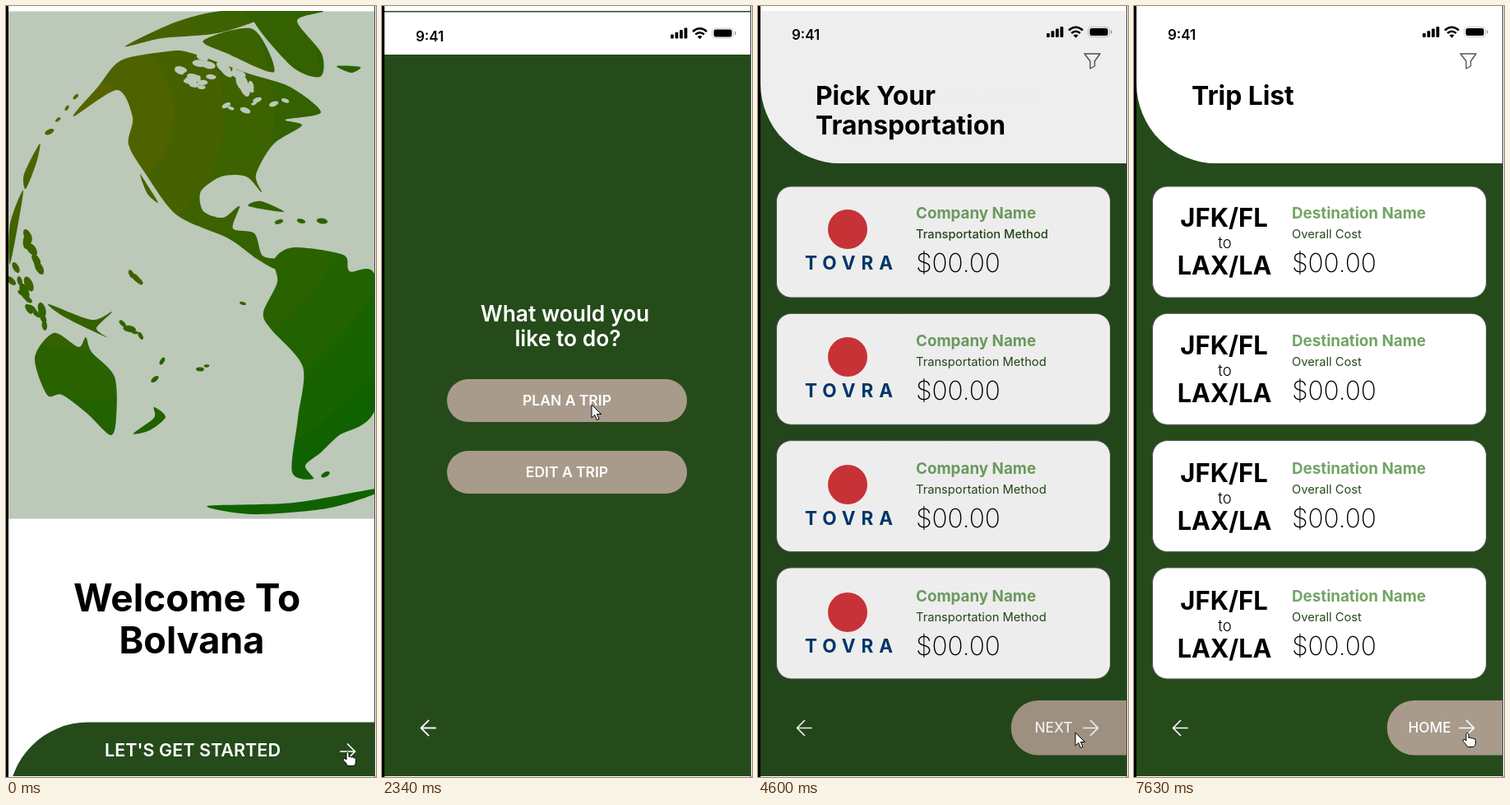
Recreate the animation shown at these times as an HTML page. Size 450 px wide and 936 px high, loop 8 s.

```html
<!DOCTYPE html>
<html lang="en">
<head>
<meta charset="utf-8">
<title>Trip planner walkthrough</title>
<style>
  html, body { margin: 0; width: 100%; height: 100%; overflow: hidden; background: #fff; }
  svg { display: block; width: 450px; height: 936px; font-family: Inter, "Open Sans", sans-serif; }
  .line { fill: none; stroke: #fff; stroke-width: 1.7; stroke-linecap: round; stroke-linejoin: round; }
</style>
</head>
<body>
<svg id="stage" viewBox="0 0 450 936"></svg>
<script>
const GREEN = '#254b1b', TAN = '#a89b8b', SEA = '#bcc8b8', LEAF = '#72a564', LAND = 'url(#landFill)';

// ---- drawing helpers ----
const repeat = (n, draw) => Array.from({ length: n }, (_, i) => draw(i)).join('');
const text = (str, x, y, size, weight = 400, fill = '#000', extra = '') =>
  `<text x="${x}" y="${y}" font-size="${size}" font-weight="${weight}" fill="${fill}" ${extra}>${str}</text>`;
const centered = (str, x, y, size, weight, fill = '#fff') =>
  text(str, x, y, size, weight, fill, 'text-anchor="middle"');
const rect = (x, y, w, h, fill, rx = 0, extra = '') =>
  `<rect x="${x}" y="${y}" width="${w}" height="${h}" rx="${rx}" fill="${fill}" ${extra}/>`;
const path = (d, fill) => `<path d="${d}" fill="${fill}"/>`;
const line = (d, extra = '') => `<path class="line" d="${d}" ${extra}/>`;
const shift = (x, y, content) => `<g transform="translate(${x} ${y})">${content}</g>`;

let seed = 7;
const random = () => (seed = seed * 16807 % 2147483647) / 2147483647;
const jitter = amount => (random() - 0.5) * 2 * amount;

// ---- globe ----
// Closed smooth coast through a few key points
function land(points) {
  const p = points.split(' ').map(s => s.split(',').map(Number));
  const at = i => p[(i + p.length) % p.length];
  const handle = (i, sign) => at(i).map((v, k) => v + sign * (at(i + 1)[k] - at(i - 1)[k]) / 7);
  return path(`M${p[0]}` + p.map((_, i) => `C${handle(i, 1)} ${handle(i + 1, -1)} ${at(i + 1)}`).join('') + 'Z', LAND);
}

// Small islands (or lakes) scattered along a line
function chain(n, x0, y0, x1, y1, size = 3, spread = 2, fill = LAND) {
  const slope = Math.atan2(y1 - y0, x1 - x0) * 180 / Math.PI;
  return repeat(n, i => {
    const u = n > 1 ? i / (n - 1) : 0;
    const x = x0 + (x1 - x0) * u + jitter(spread), y = y0 + (y1 - y0) * u + jitter(spread);
    const length = size * (1 + random()), turn = slope + jitter(30);
    return `<ellipse cx="${x}" cy="${y}" rx="${length}" ry="${length / 2}" fill="${fill}" transform="rotate(${turn} ${x} ${y})"/>`;
  });
}

const globe = () => [
  // the Americas
  land('82,134 112,98 140,66 198,55 225,57 295,82 345,98 383,129 340,138 360,145 325,168 304,205 311,226 292,207 262,207 237,225 240,249 264,257 284,243 276,270 302,276 312,303 334,308 330,320 305,307 270,282 208,254 170,204 149,168 154,135 135,102'),
  land('326,308 350,293 410,302 418,322 450,331 450,486 404,522 383,542 364,558 374,574 348,566 355,500 361,438 322,392 313,372 330,335'),
  land('163,204 175,222 185,239 172,228'),
  land('295,243 310,237 338,250'),
  chain(3, 333, 261, 384, 261, 4, 1),
  // the far north, with its lakes
  land('145,49 205,20 262,6 330,6 262,32 190,39'),
  land('298,6 385,6 354,18 384,58 382,86 346,72'),
  land('240,42 300,28 326,80 270,58'),
  land('402,73 431,74 420,81'),
  chain(10, 205, 84, 242, 94, 4.5, 9, SEA),
  chain(9, 232, 62, 300, 98, 5.5, 9, SEA),
  chain(7, 262, 124, 335, 118, 3.5, 6, SEA),
  chain(6, 282, 80, 298, 102, 6, 5, SEA),
  // the south
  land('245,607 350,603 450,586 450,592 390,610 300,617'),
  chain(1, 390, 568, 390, 568),
  // East Asia and Oceania
  land('41,167 22,204 24,222 37,190'),
  land('21,224 5,264 4,313 10,290'),
  chain(4, 52, 152, 84, 110, 3, 1),
  chain(7, 25, 280, 40, 318, 5, 3),
  chain(13, 8, 325, 45, 385, 5.5, 8),
  land('52,362 104,381 129,371 110,391 122,402 72,378'),
  land('35,427 58,397 88,414 97,402 104,420 132,450 134,500 127,521 98,494 68,472 50,472'),
  land('155,519 180,500 180,487 194,499 175,515'),
  chain(4, 143, 387, 164, 402, 4),
  chain(3, 152, 325, 162, 334, 4, 1),
  chain(2, 190, 431, 181, 453, 3, 0),
  chain(2, 236, 441, 244, 437, 2.5, 0),
  chain(1, 288, 361, 288, 361, 2, 0),
].join('');

// Concentric bands, each a little less red than the one inside it
const landGradient = () => {
  const radius = 530, edge = k => Math.max(0, 61 * k - 18) / radius;
  return `<radialGradient id="landFill" gradientUnits="userSpaceOnUse" cx="100" cy="130" r="${radius}">` +
    repeat(9, k => [edge(k), edge(k + 1)].map(offset =>
      `<stop offset="${offset}" stop-color="rgb(${88 - 9 * k} 98 0)"/>`).join('')) + '</radialGradient>';
};

// ---- interface parts ----
const backArrow = line('M65 876.5H48M56.5 867.5l-9 9 9 9');
const forwardArrow = (x, y) => line(`M${x} ${y}h17.5m-9-9l9 9-9 9`);
const pill = (y, label) => rect(79, y, 292, 52, TAN, 26) + centered(label, 225, y + 32, 17.5, 600);

const statusBar = top => shift(0, top,
  text('9:41', 41, 17, 17, 600) +
  repeat(4, i => rect(351 + i * 5.5, 9 - i * 2.7, 3.8, 5 + i * 2.7, '#000', 1)) +
  line('M378 5.5q8.5-7.5 17 0M381.2 9q5.3-4.5 10.6 0', 'style="stroke:#000;stroke-width:2.6;stroke-linecap:butt"') +
  path('M383.5 11.5q3-2 6 0l-3 3.2z', '#000') +
  rect(401.5, 1.5, 26, 12, 'none', 3.5, 'stroke="#ccc"') + rect(403.5, 3, 22, 9, '#000', 2.5) +
  rect(429, 5.5, 1.3, 4, '#999'));

const header = (...lines) => rect(3, 6, 445, 929, GREEN) +
  path('M3 6V94A97 97 0 0 0 100 191H448V6Z', '#fff') + statusBar(24) +
  line('M397 58H416L409.5 67V73L404 76V67Z', 'style="stroke:#555;stroke-width:1.4"') +
  lines.map((s, i) => text(s, 70, 120 + i * 36, 31.8, 700)).join('');

const footer = label => backArrow +
  path('M341 843H448V909.5H341A33 33 0 0 1 341 843Z', TAN) +
  centered(label, 359.5, 882, 17.2, 500) + forwardArrow(396, 876.5);

const field = (top, label) => shift(0, top,
  centered(label, 226, 26, 25.5, 600) +
  text('Enter your response here', 105, 97, 20, 500, '#9bad97') +
  rect(32, 113.5, 388, 1, '#3a5c33') +
  '<circle class="line" cx="375.5" cy="88" r="8"/>' + line('M381.5 94l6 6'));

const cards = content => repeat(4, i =>
  rect(22.5, 219 + i * 154.3, 406, 135, '#fff', 18, 'stroke="#555"') + shift(0, i * 155, content(i)));
const details = (x, name, note, price, noteWeight = 400) =>
  text(name, x, 258, 18.8, 700, LEAF) + text(note, x, 282, 14.7, noteWeight, GREEN) + text(price, x, 323, 31.5, 200);

const carrierLogo = '<circle cx="109" cy="271" r="24" fill="#d6363c"/>' +
  text('TOVRA', 57, 320, 22.5, 700, '#003a70', 'letter-spacing="7"');
const hotelLogo = rect(48, 263, 38, 38, '#4a4a4a') +
  text('Wistam', 92, 291, 25, 600, '#4a4a4a', 'font-family="Noto Serif, serif"');

// ---- pages: the cursor reaches the button, then clicks it to reveal the next page ----
const LOOP = 8000;
const pages = [
  { reach: 0, click: 710, button: [414, 905],
    art: rect(3, 6, 445, 929, '#fff') + rect(3, 6.5, 445, 616, SEA) + globe() +
      centered('Welcome To', 220, 735, 46, 700, '#000') + centered('Bolvana', 226, 786, 45, 700, '#000') +
      path('M3 966.5A97 97 0 0 1 100 869.5H448V966Z', GREEN) +
      centered("LET'S GET STARTED", 227, 911, 21.6, 600) + forwardArrow(407, 905) },

  { reach: 1780, click: 2340, button: [255, 484], lead: 0.05,
    art: rect(3, 6, 445, 929, GREEN) + rect(3, 7.5, 445, 51.5, '#fff') + statusBar(25.5) +
      centered('What would you', 222.5, 383, 26.4, 600) + centered('like to do?', 226, 413, 26.4, 600) +
      pill(453, 'PLAN A TRIP') + pill(540, 'EDIT A TRIP') + backArrow },

  { reach: 3500, click: 4450, button: [386, 882], lead: 0,
    art: header('Pick a Destination') + field(360, 'Where To?') + field(520, 'From Where?') +
      pill(682, 'USE CURRENT LOCATION') + footer('NEXT') },

  { reach: 5280, click: 5680, button: [386, 887], lead: 0.48, throughBlack: true,
    art: header('Pick Your', 'Transportation') + cards(i => carrierLogo +
      details(192, 'Company Name', 'Transportation Method', '$00.00', i ? 400 : 500)) + footer('NEXT') },

  { reach: 6770, click: 7360, button: [404, 882], lead: -0.05, throughBlack: true,
    art: header('Pick Your', 'Lodging') + cards(i => hotelLogo +
      details(210, 'Lodging Name', 'Room Information', '$00.00/', i ? 400 : 500) +
      text('per night', 320, 323, 18.7, 300)) + footer('NEXT') },

  { reach: 7630, click: LOOP, button: [404, 882], lead: 0.1,
    art: header('Trip List') + cards(() => centered('JFK/FL', 109.5, 268, 31, 700, '#000') +
      centered('to', 110.5, 294, 18.5, 300, '#000') + centered('LAX/LA', 110, 326, 30.6, 700, '#000') +
      details(192, 'Destination Name', 'Overall Cost', '$00.00')) + footer('HOME') },
];

document.getElementById('stage').innerHTML = `
  <defs>${landGradient()}<clipPath id="screen">${rect(3, 6, 445, 929, '#000')}</clipPath></defs>
  <g clip-path="url(#screen)">
    ${rect(3, 6, 445, 929, '#000')}
    ${pages.map(p => `<g class="page">${p.art}</g>`).join('')}
    <g id="back">${backArrow}</g>
  </g>
  ${rect(0, 0, 3, 936, '#000')}${rect(448, 0, 1, 936, '#444')}
  <g id="cursor" fill="#fff" stroke="#000" stroke-linejoin="round">
    <path id="arrow" d="M0 0V16L3.8 12.5 6.3 18.5 9 17.4 6.5 11.5H11.5Z"/>
    <path id="hand" d="M0 1.5Q1.5-.5 3 1.5V6.5Q5 5.5 6 7Q8 6 9 7.8Q11.5 7 11.5 9.5V13Q11 16 9 17.5H1.5Q0 14-4 10.5Q-4 8-2 8.5L0 10Z"/>
  </g>`;

// ---- timeline ----
const STEP = 120, GLIDE = 360;   // ms per fade step, ms per cursor move
const clamp = v => Math.min(1, Math.max(0, v));
const byId = id => document.getElementById(id);
const layers = document.querySelectorAll('.page');
const show = (node, on) => node.setAttribute('visibility', on ? 'visible' : 'hidden');

// Fades advance in visible steps after each click
function reveal(i, t) {
  if (i === 0) return 1;
  const since = t - (pages[i - 1]?.click ?? LOOP);
  return since < 0 || !pages[i] ? 0 : clamp(pages[i].lead + 0.45 * Math.floor(since / STEP));
}

function render(t) {
  layers.forEach((layer, i) => {
    const next = reveal(i + 1, t);
    const stay = next === 1 ? 0 : pages[i + 1]?.throughBlack ? 1 - next : 1;
    const opacity = reveal(i, t) * stay;
    layer.setAttribute('opacity', opacity);
    show(layer, opacity > 0);
  });
  show(byId('back'), reveal(1, t) > 0.4 && reveal(2, t) < 1);

  const i = pages.findLastIndex(p => p.reach - GLIDE <= t);
  const { reach, click, button } = pages[i];
  const from = pages[Math.max(0, i - 1)].button;
  const u = clamp(1 + (t - reach) / GLIDE), eased = u * u * (3 - 2 * u);
  const position = button.map((v, k) => from[k] + (v - from[k]) * eased);
  const hand = t >= reach && t < click;
  show(byId('hand'), hand);
  show(byId('arrow'), !hand);
  byId('cursor').setAttribute('transform', `translate(${position})`);
}

const began = performance.now();
function loop() {
  render((performance.now() - began) % LOOP);
  requestAnimationFrame(loop);
}
loop();
</script>
</body>
</html>
```
